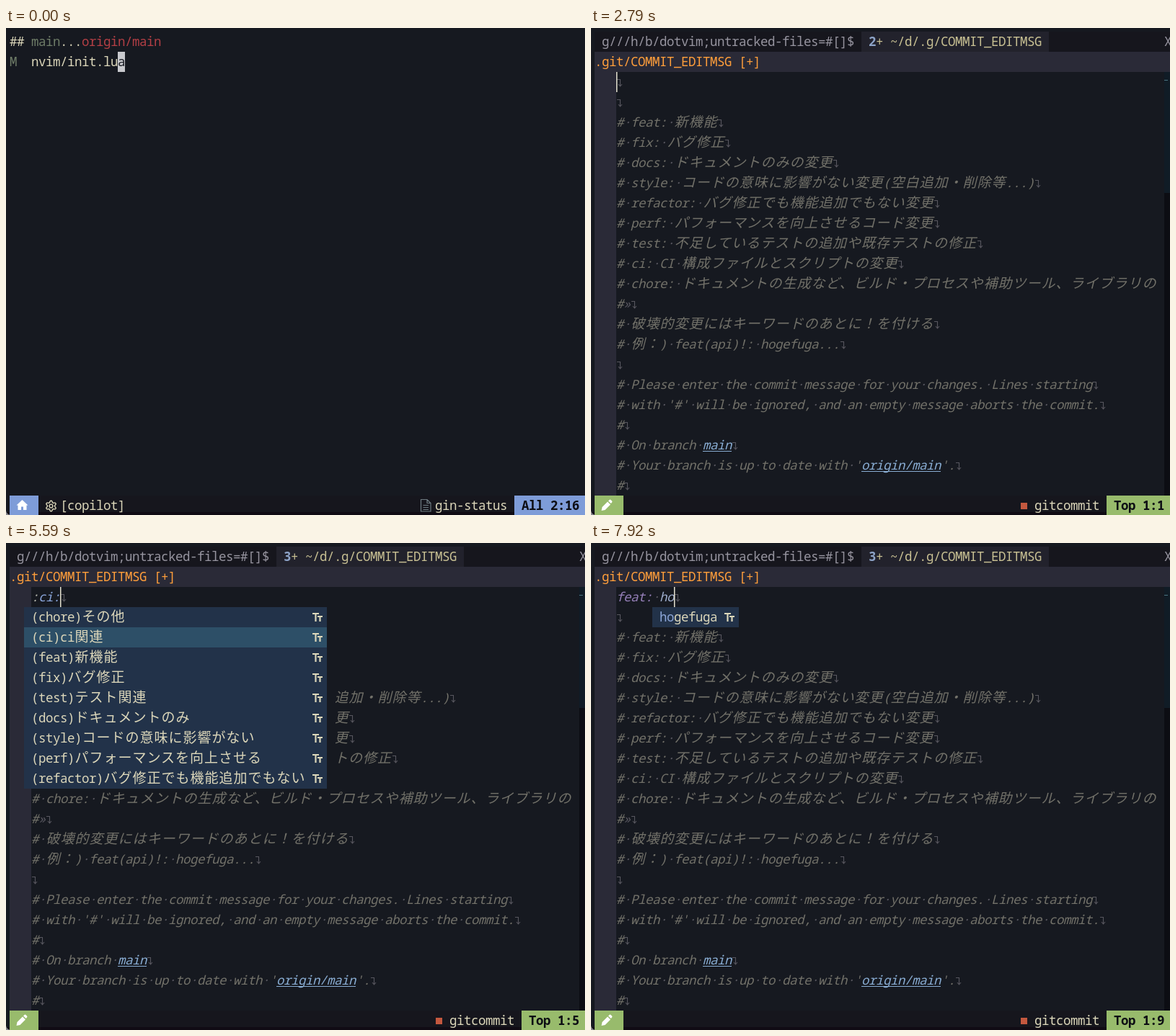
Animation of 803 by 676 pixels, one loop 8 s. Source, as an HTML page:

```html
<!DOCTYPE html>
<html lang="ja">
<head>
<meta charset="utf-8">
<title>Commit message completion</title>
<style>
  html, body { margin: 0; width: 100%; height: 100%; overflow: hidden; background: #161920; }
  svg { display: block; width: 803px; height: 676px; }
  text { white-space: pre; font: 17.5px "Noto Sans Mono", monospace; letter-spacing: -.5px; }
  .wide { font: 19px "Noto Sans CJK JP", "Noto Sans CJK", sans-serif; letter-spacing: 1px; }
  .italic { font-style: italic; }
  .bold { font-weight: 700; }
</style>
</head>
<body>
<svg id="stage" viewBox="0 0 803 676"></svg>
<script>
const LOOP = 8000, CELL = 10, ROW = 28;
const C = {
  bg: '#161920', dark: '#16161d', tab: '#22222c', gutter: '#2a2a37', fg: '#dcd7ba',
  comment: '#727169', faint: '#58575f', link: '#8aaed4', blue: '#7e9cd8', green: '#98bb6c',
  orange: '#ff9e3b', menu: '#223249', chosen: '#2d4f67', violet: '#957fb8', pale: '#9cabca',
  cursor: '#c8c9cd', moss: '#6f7d68', red: '#b33f45', lilac: '#96949f', count: '#8ea4c8',
  colon: '#b5b6ad', type: '#8aa5da'
};
const MESSAGE = [
  '↴',
  '#·feat:·新機能↴',
  '#·fix:·バグ修正↴',
  '#·docs:·ドキュメントのみの変更↴',
  '#·style:·コードの意味に影響がない変更(空白追加・削除等...)↴',
  '#·refactor:·バグ修正でも機能追加でもない変更↴',
  '#·perf:·パフォーマンスを向上させるコード変更↴',
  '#·test:·不足しているテストの追加や既存テストの修正↴',
  '#·ci:·CI·構成ファイルとスクリプトの変更↴',
  '#·chore:·ドキュメントの生成など、ビルド・プロセスや補助ツール、ライブラリの',
  '#»↴',
  '#·破壊的変更にはキーワードのあとに！を付ける↴',
  '#·例：)·feat(api)!:·hogefuga...↴',
  '↴',
  '#·Please·enter·the·commit·message·for·your·changes.·Lines·starting↴',
  "#·with·'#'·will·be·ignored,·and·an·empty·message·aborts·the·commit.↴",
  '#↴',
  '#·On·branch·main↴',
  "#·Your·branch·is·up·to·date·with·'origin/main'.↴",
  '#↴',
  '#·Changes·to·be·committed:↴'
];
const MENU = ['(chore)その他', '(ci)ci関連', '(feat)新機能', '(fix)バグ修正', '(test)テスト関連',
  '(docs)ドキュメントのみ', '(style)コードの意味に影響がない', '(perf)パフォーマンスを向上させる',
  '(refactor)バグ修正でも機能追加でもない'];

const left = col => 5 + CELL * col;
const rowTop = row => 5 + ROW * row;
const rect = (x, y, w, h, fill) => `<rect x="${x}" y="${y}" width="${w}" height="${h}" fill="${fill}"/>`;
const fillPath = (d, fill) => `<path d="${d}" fill="${fill}"/>`;
const linePath = (d, color, width) => `<path d="${d}" fill="none" stroke="${color}" stroke-width="${width}"/>`;

const PIECES = /(↴|[·»]|(?:origin\/)?main|[\u3000-\u9fff\uff00-\uffef]+)/;
const isWide = s => /[\u3000-\u9fff\uff00-\uffef]/.test(s);

// Places text on the terminal grid; wide characters take two cells.
function put(col, row, str, color, cls = '') {
  let out = '';
  for (const piece of str.split(PIECES)) {
    if (!piece) continue;
    const x = left(col), base = rowTop(row) + 20, wide = isWide(piece);
    if (piece === '↴') {
      out += linePath(`M${x + 1} ${base - 9.5}h4.5v9.5m-2.5-3l2.5 3 2.5-3`, C.faint, 1.1);
    } else {
      const link = cls === 'italic' && piece.endsWith('main');
      const fill = /[·»]/.test(piece) ? C.faint : link ? C.link : color;
      out += `<text class="${cls}${wide ? ' wide' : ''}" x="${x + (wide ? .5 : 0)}" y="${base}" fill="${fill}">${piece}</text>`;
      if (link) out += rect(x, base + 2, piece.length * CELL, 1, C.link);
    }
    col += piece.length * (wide ? 2 : 1);
  }
  return out;
}

function putAll(col, row, parts, cls) {
  return parts.map(([str, color]) => {
    const drawn = put(col, row, str, color, cls);
    col += str.length;
    return drawn;
  }).join('');
}

const home = fillPath('M22.5 655l-8 7.5h2v6.5h4.5v-4.5h3v4.5h4.5v-6.5h2z', '#fff');
const pencil = fillPath('M14.5 670l1-5 7.5-7.5 4 4-7.5 7.5zM24 656.5l1.5-1.5q1-1 2 0l1.5 1.5q1 1 0 2l-1.3 1.5z', '#fff');

function gear() {
  const points = Array.from({ length: 48 }, (_, i) => {
    const a = i * Math.PI / 24, r = 6.2 + 1.1 * Math.tanh(3 * Math.cos(6 * a));
    return `${(62.5 + r * Math.sin(a)).toFixed(1)} ${(663.5 - r * Math.cos(a)).toFixed(1)}`;
  });
  return linePath(`M${points.join('L')}z`, C.fg, 1.4) +
    `<circle cx="62.5" cy="663.5" r="2.4" fill="none" stroke="${C.fg}" stroke-width="1.4"/>`;
}

const fileIcon = linePath('M575.5 654.5h8.5l5 5v11.5h-13.5zM584 654.5v5h5M578.5 662.5h7.5m-7.5 3h7.5m-7.5 3h7.5', '#6d7a80', 1.2);
const textIcon = (x, row) => {
  const y = rowTop(row) + 8;
  return linePath(`M${x} ${y + 1}h9M${x + 4.5} ${y}v12M${x + 7} ${y + 5}h7M${x + 10.5} ${y + 4}v8`, C.fg, 2.2);
};

const frameEdge = rect(0, 672, 803, 4, '#100b14') + fillPath('M0 670q1 5 6 6H0z', '#85858c');
const statusEnds = (color, icon, col, label) =>
  rect(5, 649, 40, 27, color) + icon +
  rect(left(col - 1), 649, 803 - left(col - 1), 27, color) + put(col, 23, label, '#0d0e14', 'bold');

function statusView({ bar, client }) {
  let out = frameEdge +
    putAll(0, 0, [['## ', C.fg], ['main', C.moss], ['...', C.fg], ['origin/main', C.red]]) +
    putAll(0, 1, [['M  ', C.moss], ['nvim/init.lu', C.fg]]) +
    rect(155, 33, CELL, ROW, C.cursor) + put(15, 1, 'a', C.bg);
  if (bar) {
    out += rect(45, 649, 660, 23, C.dark) + fileIcon + put(59, 23, 'gin-status', C.fg) +
      statusEnds(C.blue, home, 71, 'All 2:16');
  }
  if (client) out += gear() + put(7, 23, '[copilot]', C.fg);
  return out;
}

function menuBox(chosen) {
  return rect(445, 89, CELL + 2, MENU.length * ROW, C.bg) +
    rect(25, 89, 420, MENU.length * ROW, C.menu) +
    MENU.map((item, i) =>
      (i === chosen ? rect(25, rowTop(3 + i), 420, ROW, C.chosen) : '') +
      put(3, 3 + i, item, C.fg) + textIcon(425, 3 + i)).join('');
}

function wordBox(typed) {
  const word = 'hogefuga';
  return rect(85, 89, 120, ROW, C.menu) +
    putAll(9, 3, [[word.slice(0, typed), '#8ca6d8'], [word.slice(typed), C.fg]]) + textIcon(185, 3);
}

function commitView({ insert = true, parts = [], popup = '' }) {
  const typed = parts.reduce((n, [str]) => n + str.length, 0);
  const windows = popup ? '3' : '2', mark = insert ? '+' : '';
  const body = insert ? MESSAGE.slice(0, 20) : MESSAGE.slice(1);
  const cursorX = left(3 + typed);
  return frameEdge +
    rect(5, 5, 798, ROW, C.dark) + rect(375, 5, 250 + CELL * mark.length, ROW, C.tab) +
    put(1, 0, 'g///h/b/dotvim;untracked-files=#[]$', C.lilac) +
    put(38, 0, windows, C.count, 'bold') + put(39, 0, mark + ' ~/d/.g/COMMIT_EDITMSG', '#c8c093') +
    put(79, 0, 'X', C.lilac) +
    rect(5, 33, 798, ROW, C.gutter) + put(0, 1, '.git/COMMIT_EDITMSG' + (insert ? ' [+]' : ''), C.orange) +
    rect(5, 61, 30, 588, C.gutter) +
    rect(795, 61, 8, 168, '#101c26') + rect(795, 229, 8, 420, '#0c0d13') + rect(795, 72, 5, 1, '#4b7480') +
    (insert ? '' : rect(35, 61, CELL, ROW, C.cursor)) +
    putAll(3, 2, [...parts, ['↴', C.faint]], 'italic') +
    body.map((str, i) => put(3, 3 + i, str, C.comment, 'italic')).join('') +
    (insert ? rect(cursorX, 61, 1.5, ROW, '#e4e1d0') : '') + popup +
    rect(45, 649, 670, 23, C.dark) + rect(596, 659, 9, 9, '#c4583f') + put(61, 23, 'gitcommit', C.fg) +
    statusEnds(insert ? C.green : C.blue, insert ? pencil : home, 72, `Top 1:${typed + 1}`);
}

const choose = i => commitView({
  parts: [[':', C.colon], [MENU[i].match(/\w+/)[0] + ':', C.type]], popup: menuBox(i)
});
const summary = (word, popup) => commitView({
  parts: [['feat:', C.violet], ['·', C.faint], [word, C.pale]], popup
});

const timeline = [
  [0, statusView({ bar: true, client: true })],
  [730, statusView({ bar: true })],
  [1460, statusView({})],
  [1800, commitView({ insert: false })],
  [2790, commitView({})],
  [3270, commitView({ parts: [[':', C.colon]], popup: menuBox(-1) })],
  [5320, choose(0)],
  [5590, choose(1)],
  [5800, choose(2)],
  [6790, summary('')],
  [7720, summary('h')],
  [7820, summary('h', wordBox(1))],
  [7920, summary('ho', wordBox(2))]
];

const stage = document.getElementById('stage');
let shown;
function draw() {
  const t = performance.now() % LOOP;
  const view = timeline.findLast(([start]) => start <= t)[1];
  if (view !== shown) stage.innerHTML = shown = view;
  requestAnimationFrame(draw);
}
draw();
</script>
</body>
</html>
```
